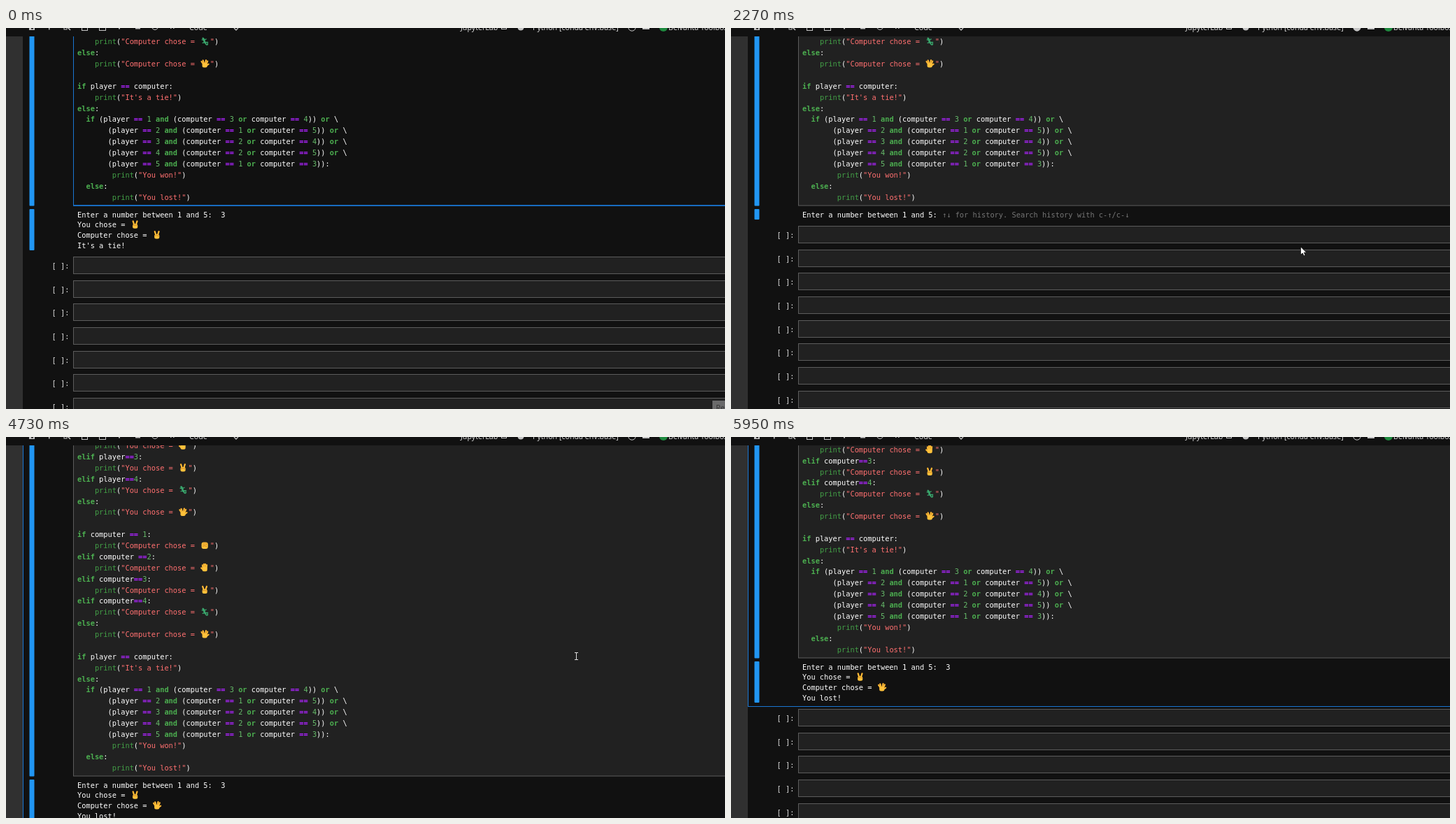
Recreate the animation shown at these times as an HTML page with a canvas. Size 1028 by 545 pixels, loop 6.98 s.

```html
<!DOCTYPE html>
<html lang="en">
<head>
<meta charset="utf-8">
<title>Notebook game</title>
<style>
html, body { margin: 0; width: 100%; height: 100%; overflow: hidden; background: #111; }
canvas { display: block; }
</style>
</head>
<body>
<canvas id="stage" width="1028" height="545"></canvas>
<script>
const ctx = document.getElementById('stage').getContext('2d');
const W = 1028, H = 545, LOOP = 6980, TOP = 12;
const CHAR = 6.22, LINE = 15.87, OUT_LINE = 14.75, CELL = 33.65;
const MONO = '10.33px "DejaVu Sans Mono", monospace';
const SANS = '10.7px "Open Sans", sans-serif';
const BLUE = '#1976d2', BAR = '#2196f3', GREY = '#5c5c5c';
const SKIN = '#ffc13b', SHADE = '#c97f1c';

const code = String.raw`
    print("You chose = ✋")
elif player==3:
    print("You chose = ✌")
elif player==4:
    print("You chose = 🦎")
else:
    print("You chose = 🖖")

if computer == 1:
    print("Computer chose = ✊")
elif computer ==2:
    print("Computer chose = ✋")
elif computer==3:
    print("Computer chose = ✌")
elif computer==4:
    print("Computer chose = 🦎")
else:
    print("Computer chose = 🖖")

if player == computer:
    print("It's a tie!")
else:
  if (player == 1 and (computer == 3 or computer == 4)) or \
       (player == 2 and (computer == 1 or computer == 5)) or \
       (player == 3 and (computer == 2 or computer == 4)) or \
       (player == 4 and (computer == 2 or computer == 5)) or \
       (player == 5 and (computer == 1 or computer == 3)):
        print("You won!")
  else:
        print("You lost!")`.slice(1).split('\n');

const prompt = 'Enter a number between 1 and 5:';
const results = {
  tie: [prompt + '  3', 'You chose = ✌', 'Computer chose = ✌', "It's a tie!"],
  lost: [prompt + '  3', 'You chose = ✌', 'Computer chose = 🖖', 'You lost!']
};

const styles = [
  [/^"/, '#ff7070'],
  [/^(if|elif|else|and|or)$/, '#4caf50', 'bold '],
  [/^print$/, '#43a047'],
  [/^==$/, '#aa22ff', 'bold '],
  [/^\d$/, '#66bb6a'],
  [/./, '#fff']
];

function box(x, y, w, h, color) {
  ctx.fillStyle = color;
  ctx.fillRect(x, y, w, h);
}

function frame(x, y, w, h, color) {
  ctx.strokeStyle = color;
  ctx.lineWidth = 1;
  ctx.strokeRect(x, y, w, h);
}

function line(color, width, ...points) {
  ctx.strokeStyle = color;
  ctx.lineWidth = width;
  ctx.beginPath();
  points.forEach(([x, y]) => ctx.lineTo(x, y));
  ctx.stroke();
}

function disc(x, y, r, color) {
  ctx.fillStyle = color;
  ctx.beginPath();
  ctx.arc(x, y, r, 0, 7);
  ctx.fill();
}

function rounded(x, y, w, h, r, color) {
  ctx.fillStyle = color;
  ctx.beginPath();
  ctx.roundRect(x, y, w, h, r);
  ctx.fill();
}

// Each finger runs from a point on the palm to its tip.
const hands = {
  '✋': [[-2.7, 0, -3.2, -3.4], [-1, 0, -1.2, -5], [0.8, 0, 0.9, -5], [2.5, 0, 2.9, -3.8], [-2, 3, -5, 0.6]],
  '🖖': [[-2.5, 0, -4.6, -3.2], [-1, 0, -2.5, -4.6], [0.9, 0, 1.8, -5], [2.5, 0, 4, -3.6], [2, 3, 5.4, 0.6]],
  '✌': [[-1.4, 0, -3, -4.8], [1.2, 0, 2.8, -4.8]],
  '✊': []
};

function emoji(ch, x, y) {
  ctx.save();
  ctx.translate(x, y);
  ctx.lineCap = 'round';
  if (ch === '🦎') {
    const green = '#3aa76d';
    line(green, 1.3, [-4, -2.5], [-1, -2], [2, -3.5]);
    line(green, 1.3, [-3, 2], [0.5, 1], [4.5, 1]);
    ctx.lineWidth = 2.6;
    ctx.beginPath();
    ctx.moveTo(-2.5, -4.5);
    ctx.bezierCurveTo(0, -3, -1.5, 1, 1, 2);
    ctx.stroke();
    ctx.lineWidth = 1.5;
    ctx.beginPath();
    ctx.moveTo(1, 2);
    ctx.bezierCurveTo(2, 6, 5, 5, 4, 2.5);
    ctx.stroke();
  } else {
    const fist = ch === '✊';
    for (const [a, b, c, d] of hands[ch]) {
      line(SHADE, 2.3, [a, b], [c, d]);
      line(SKIN, 1.7, [a, b], [c, d]);
    }
    if (fist) rounded(-4.6, -4.6, 9.2, 9.6, 3, SKIN);
    else rounded(-3.6, -1, 7.2, 6.4, 2.5, SKIN);
    if (fist) for (const k of [-2, 0.2, 2.4]) line(SHADE, 0.7, [k, -3.6], [k, -0.5]);
    if (fist || ch === '✌') line(SHADE, 0.8, [-3, 1.2], [0, 0.6], [2.6, 1.6]);
  }
  ctx.restore();
}

// Draws mono text around a middle height and returns the next x.
function text(str, x, mid, color = '#fff', weight = '') {
  ctx.font = weight + MONO;
  for (const part of str.split(/([✊✋✌🦎🖖])/u)) {
    if (part in hands || part === '🦎') {
      emoji(part, x + 8, mid - 0.5);
      x += 15.5;
    } else {
      ctx.fillStyle = color;
      ctx.fillText(part, x, mid + 3.5);
      x += part.length * CHAR;
    }
  }
  return x;
}

function codeLine(str, mid) {
  let x = 102;
  for (const token of str.match(/"[^"]*"|\w+|==|\s+|./gu) || []) {
    const [, color, weight] = styles.find(([rule]) => rule.test(token));
    x = text(token, x, mid, color, weight);
  }
}

function scrollAt(t) {
  if (t < 390) return 0;
  if (t < 1650) return 236.5;
  if (t < 3410) return 0;
  if (t < 4730) return 236.5;
  return [231, 195, 148, 106, 77, 62][Math.min(5, Math.floor((t - 4730) / 30))];
}

function modeAt(t) {
  if (t < 390) return 'edit';
  if (t < 1650) return 'focus';
  if (t < 1740) return 'next';
  if (t < 2950) return 'input';
  if (t < 3060) return 'plain';
  return t < 3410 ? 'edit' : 'focus';
}

function drawInput(t) {
  text(prompt, 102, 267);
  const typed = t >= 2570;
  if (typed) text('3', 302, 267);
  else text('↑↓ for history. Search history with c-↑/c-↓', 302, 267, '#757575');
  if (t < 2270 || typed) box(typed ? 309 : 302, 257, 1, 13, '#fff');
}

function drawNotebook(t) {
  const mode = modeAt(t), next = mode === 'next', input = mode === 'input', edit = mode === 'edit';
  ctx.save();
  ctx.translate(0, scrollAt(t));
  box(96, -300, 1000, 554, edit ? '#111' : '#212121');
  frame(96.5, -300.5, 1000, 554.5, edit ? BLUE : GREY);
  if (edit) box(96, 253, W, 1.6, BLUE);
  code.forEach((str, i) => codeLine(str, 242 - (code.length - 1 - i) * LINE));

  if (!next) {
    rounded(33.5, -300, 7, 554.5, 1, BAR);
    rounded(33.5, 259, 7, input ? 15 : 59, 1, BAR);
    if (input) drawInput(t);
    else results[t < 1650 ? 'tie' : 'lost'].forEach((str, i) => text(str, 102, 267 + i * OUT_LINE));
  }
  if (mode === 'focus') frame(24.5, -300.5, 1100, 624, BLUE);

  const first = next ? 281 : input ? 283 : 327;
  for (let i = 0; i < 9; i++) {
    const y = Math.round(first + i * CELL), active = next && i === 0;
    if (active) {
      ctx.strokeStyle = BLUE;
      ctx.lineWidth = 1.3;
      ctx.beginPath();
      ctx.roundRect(24.5, y - 4.5, 1100, 34, 2);
      ctx.stroke();
      rounded(33.5, y + 0.5, 7, 24.5, 1, BAR);
    }
    box(96, y, W, 25, '#212121');
    frame(96.5, y + 0.5, W, 24, GREY);
    text('[ ]:', 65.5, y + 13, active ? BLUE : '#e0e0e0');
  }
  ctx.restore();
}

function drawToolbar(t) {
  const ink = '#c4c4c4';
  box(0, 0, W, TOP, '#111');
  box(33, 0, 8, 3, ink);
  box(36, 0, 3, 1.5, '#111');
  box(61, 0, 1.5, 2.5, ink);
  frame(83, -2, 4, 4, ink);
  line(ink, 1.5, [87, -2], [92, 3]);
  frame(108.5, -6, 8, 9.5, ink);
  frame(133.5, -6, 9, 9.5, ink);
  box(161, 0, 2, 1.5, ink);
  box(185, -4, 7, 5.5, ink);
  ctx.beginPath();
  ctx.arc(213, -2, 4.5, 0, 3.2);
  ctx.stroke();
  box(235, 0, 1.5, 1, ink);
  box(239, 0, 1.5, 1, ink);
  line(ink, 1.3, [326, 0], [329, 3], [332, 0]);
  frame(708.5, -5, 7, 6.5, ink);
  disc(736, -1, 4.5, ink);
  box(910, 0, 10, 2, ink);

  ctx.strokeStyle = ctx.fillStyle = ink;
  ctx.beginPath();
  ctx.arc(895, -1, 5.2, 0, 7);
  ctx.stroke();
  if (t >= 1740 && t < 2980) ctx.fill();
  disc(940, -1, 6, '#1f8a3f');

  ctx.font = SANS;
  ctx.fillStyle = '#e0e0e0';
  for (const [label, x] of [['Code', 262], ['JupyterLab', 650], ['Python [conda env:base]', 753], ['Belvanta Toolbox', 947]])
    ctx.fillText(label, x, 2.5);
}

function drawPointer(t) {
  const ramp = (a, b) => {
    const k = Math.min(1, Math.max(0, (t - a) / (b - a)));
    return k * k * (3 - 2 * k);
  };
  const away = 1 - ramp(20, 380) + ramp(5480, 5950);
  const x = 814.5 + 198 * away, y = 313 + 232 * away;
  const editorEnd = 254 + Math.min(scrollAt(t), scrollAt(t - 40));
  ctx.save();
  ctx.translate(x, y);
  if (y < editorEnd) {
    box(0.5, -5, 1, 11, '#ddd');
    box(-1.5, -5, 5, 1, '#ddd');
    box(-1.5, 5, 5, 1, '#ddd');
  } else {
    const arrow = new Path2D('M0 0V11.5L2.7 9L4.6 13L6.5 12L4.8 8.2H8.3Z');
    ctx.fillStyle = '#fff';
    ctx.fill(arrow);
    ctx.strokeStyle = '#000';
    ctx.lineWidth = 0.7;
    ctx.stroke(arrow);
  }
  ctx.restore();
}

function draw(now) {
  const t = now % LOOP;
  box(0, 0, W, H, '#111');
  drawNotebook(t);
  box(0, TOP, 24, H, '#303030');
  drawToolbar(t);
  drawPointer(t);
  if (t < 20) {
    box(1010, 533, 18, 12, '#6b6b6b');
    ctx.font = SANS;
    ctx.fillStyle = '#333';
    ctx.fillText('Re', 1015, 547);
  }
}

const start = performance.now();
function tick() {
  draw(performance.now() - start);
  requestAnimationFrame(tick);
}
tick();
</script>
</body>
</html>
```
